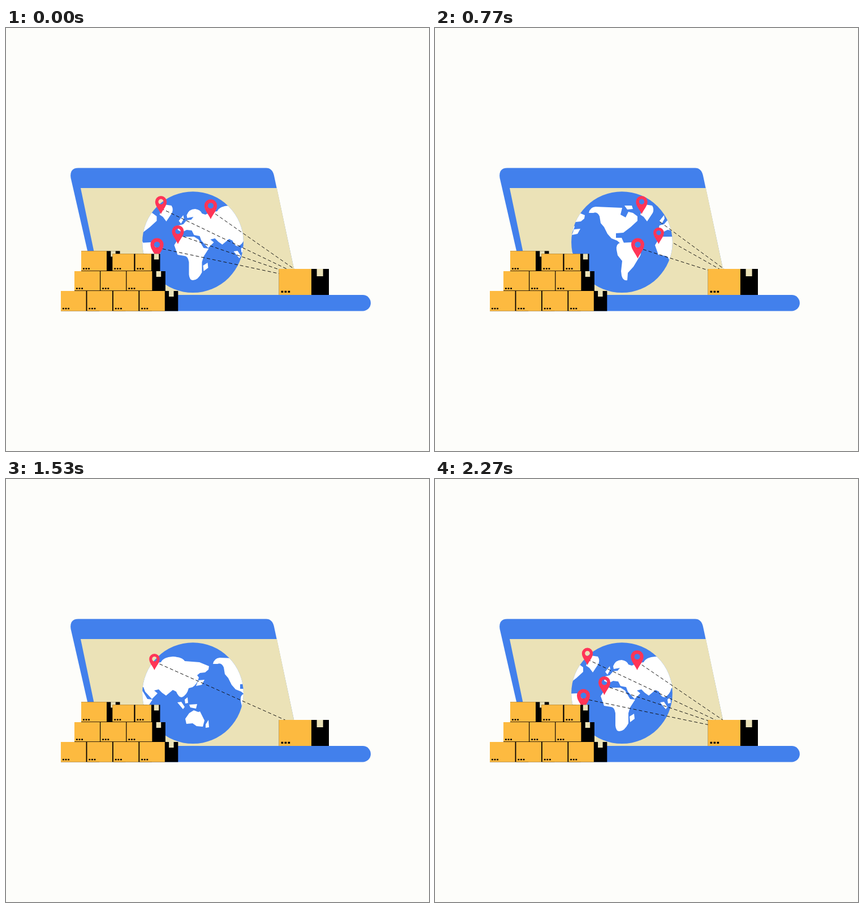
These frames come from a looping animation (748 px wide and 748 px high, 2310 ms). An HTML page with a canvas:

```html
<!DOCTYPE html>
<html lang="en">
<head>
<meta charset="utf-8">
<style>
  html, body { margin: 0; height: 100%; overflow: hidden; background: #fdfdfa; }
  canvas { display: block; }
</style>
</head>
<body>
<canvas id="stage" width="748" height="748"></canvas>
<script>
const ctx = document.getElementById('stage').getContext('2d');
const BLUE = '#4280ec', CREAM = '#ebe2b7', ORANGE = '#fdba40', RED = '#ff3557', BLACK = '#000';
const LOOP = 2310, MAP_WIDTH = 285;
const GLOBE = { x: 330.5, y: 378.7, r: 89.4 };
const HUB = { x: 538, y: 446 };

const frame = new Path2D('M114.5 265Q112 247.5 128 247.5H460Q471 247.5 474 261L519 472V490H166Z');
const screen = new Path2D('M132 283H479L519 472V474H172Z');

const oldWorld = new Path2D(
  // Eurasia
  'M254 357L256 349L264 347L270 340L278 339L282 334L271 336L270 331Q274 320 285 320Q294 321 297 328' +
  'L303 330L312 326L324 324Q328 315 345 314Q362 315 366 322L392 324L409 331L408 337L402 342L393 343' +
  'L388 347L391 351Q388 363 380 368L373 370Q370 382 361 386Q355 386 351 376L345 373L333 383' +
  'L326 378L320 372L312 374L318 379L308 389L296 376L293 368L283 366L279 358L270 357L262 361Z' +
  // Africa and Madagascar
  'M248 384L253 376L261 369L283 369L291 374L300 389L309 390L300 404L297 414V432Q290 446 281 446' +
  'Q275 446 274 436V414Q272 403 266 403L254 401Z M299 420L307 415L308 424L300 430Z' +
  // Britain, Japan, Indonesia
  'M256 341L264 331L265 337L260 346Z M386 366L390 356L401 355L396 364Z' +
  'M353 395L360 394L366 403L363 407Z M366 390L371 386L372 396L367 397Z M374 399L388 398L386 406L376 404Z' +
  // Australia and New Zealand
  'M367 424L374 414L382 409L390 412L393 411L401 427L398 438L387 437L380 432L369 433Z' +
  'M403 434L408 426L409 439L403 440Z');

const newWorld = new Path2D(
  // North America
  'M272 327Q274 317 284 316L331 318L328 330L337 335L342 325L350 327L358 333V341L346 352L333 362L320 363' +
  'V371L330 371L334 380L329 382L322 376L312 372L305 364L299 352L293 345L291 333Q287 324 280 327Z' +
  'M335 314H348L350 320L340 321Z' +
  // Greenland
  'M371 312L384 314Q388 320 385 327L375 342L369 334L363 330Z' +
  // South America
  'M321 392Q320 382 327 380L347 379L354 386L364 394Q365 401 360 407L351 422L341 433L340 446' +
  'Q333 448 330 438L329 430L331 412L323 402Z');

const pinShape = new Path2D(
  'M0 0C-4 -9 -11.5 -16 -11.5 -24.5A11.5 11.5 0 0 1 11.5 -24.5C11.5 -16 4 -9 0 0Z' +
  'M5.2 -24.5A5.2 5.2 0 0 0 -5.2 -24.5A5.2 5.2 0 0 0 5.2 -24.5Z');

// x and tip at loop start, line height, pin height, where the line grows and shrinks
const pins = [
  { x: 274, tip: 329, line: 319, size: 32, grow: 209, shrink: 358 },
  { x: 362, tip: 338, line: 323, size: 35, grow: 210, shrink: 389 },
  { x: 304, tip: 382, line: 365.5, size: 33, grow: 198, shrink: 388 },
  { x: 267, tip: 407.5, line: 388.5, size: 36, grow: 199.5, shrink: 387 }
];

// map travel in pixels at given steps
const travel = [[0, 0], [7, 29], [23, 91.5], [35, 141.5], [46, 185.5], [58, 235.5], [68, 280.5], [69, 285]];

const clamp = v => Math.max(0, Math.min(1, v));

function mapOffset(step) {
  const i = travel.findIndex(([s]) => s > step);
  const [s0, x0] = travel[i - 1], [s1, x1] = travel[i];
  return x0 + (x1 - x0) * (step - s0) / (s1 - s0);
}

function fill(color, path) {
  ctx.fillStyle = color;
  ctx.fill(path);
}

function rect(color, x, y, w, h) {
  ctx.fillStyle = color;
  ctx.fillRect(x, y, w, h);
}

function box(x, y, w, h, side = 23.5, edge = 0, k = 1) {
  rect(BLACK, x, y, w + side, h);
  rect(ORANGE, x, y, w, h - edge);
  rect(CREAM, x + w + side * 0.31, y, 8.5 * k, 10 * k);
  for (let i = 0; i < 3; i++) rect(BLACK, x + 3 * k + i * 4.6 * k, y + h - 5.6 * k, 2.8 * k, 2.5 * k);
}

function drawLaptop() {
  fill(BLUE, frame);
  fill(CREAM, screen);
  ctx.fillStyle = BLUE;
  ctx.beginPath();
  ctx.roundRect(200, 472, 445, 28.5, 14.2);
  ctx.fill();
}

function drawGlobe(offset) {
  const disc = new Path2D();
  disc.arc(GLOBE.x, GLOBE.y, GLOBE.r, 0, 2 * Math.PI);
  fill(BLUE, disc);
  ctx.save();
  ctx.clip(disc);
  for (const [land, shift] of [[oldWorld, 235.5], [newWorld, 91.5]]) {
    for (const turn of [-1, 0, 1]) {
      ctx.save();
      ctx.translate(offset - shift + turn * MAP_WIDTH, 0);
      fill('#fff', land);
      ctx.restore();
    }
  }
  ctx.restore();
}

function drawLine(pin, x) {
  const part = clamp((x - pin.grow) / 40) * clamp(1 - (x - pin.shrink) / 40);
  if (!part) return;
  ctx.beginPath();
  ctx.moveTo(HUB.x + (x - HUB.x) * part, HUB.y + (pin.line - HUB.y) * part);
  ctx.lineTo(HUB.x, HUB.y);
  ctx.stroke();
}

function drawPin(pin, x) {
  const half = Math.sqrt(GLOBE.r ** 2 - (pin.tip - GLOBE.y) ** 2);
  const fromLeft = x - (GLOBE.x - half), toRight = GLOBE.x + half - x;
  const scale = Math.min(clamp(fromLeft / 14), clamp(0.35 + toRight * 0.022)) * pin.size / 36;
  if (!scale) return;
  ctx.save();
  ctx.translate(x, pin.tip);
  ctx.scale(scale, scale);
  fill(RED, pinShape);
  ctx.restore();
}

function drawStack(hop) {
  const middle = 430 - 3.5 * hop, top = 8 * hop;
  for (let i = 0; i < 4; i++) box(97 + i * 46.4, 465, 44.6, 35.5);
  for (let i = 0; i < 3; i++) box(121 + i * 46.2, middle, 45, 35, 23.5, 0.8);
  box(133, 394.3 - top, 45, 35.7, 23.5, 0.8);
  box(188.3, 399.3 - top, 38, 30.7, 23.5, 0.8);
  box(228.5, 399.3 - top, 28.5, 30.7, 15.5, 0.8);
}

function draw() {
  const step = Math.floor((performance.now() % LOOP + 5) * 0.03) % 69;
  const offset = mapOffset(step);
  ctx.clearRect(0, 0, 748, 748);
  drawLaptop();
  drawGlobe(offset);

  const wrap = x => (x + offset - 190) % MAP_WIDTH + 190;
  ctx.strokeStyle = '#111';
  ctx.lineWidth = 1;
  ctx.setLineDash([6, 4]);
  pins.forEach(pin => drawLine(pin, wrap(pin.x)));
  pins.forEach(pin => drawPin(pin, wrap(pin.x)));

  box(482.7, 426, 57.3, 46, 31, 0, 1.3);
  drawStack(step < 18 ? Math.sin(Math.PI * step / 18) / 0.94 : 0);
  requestAnimationFrame(draw);
}
draw();
</script>
</body>
</html>
```
